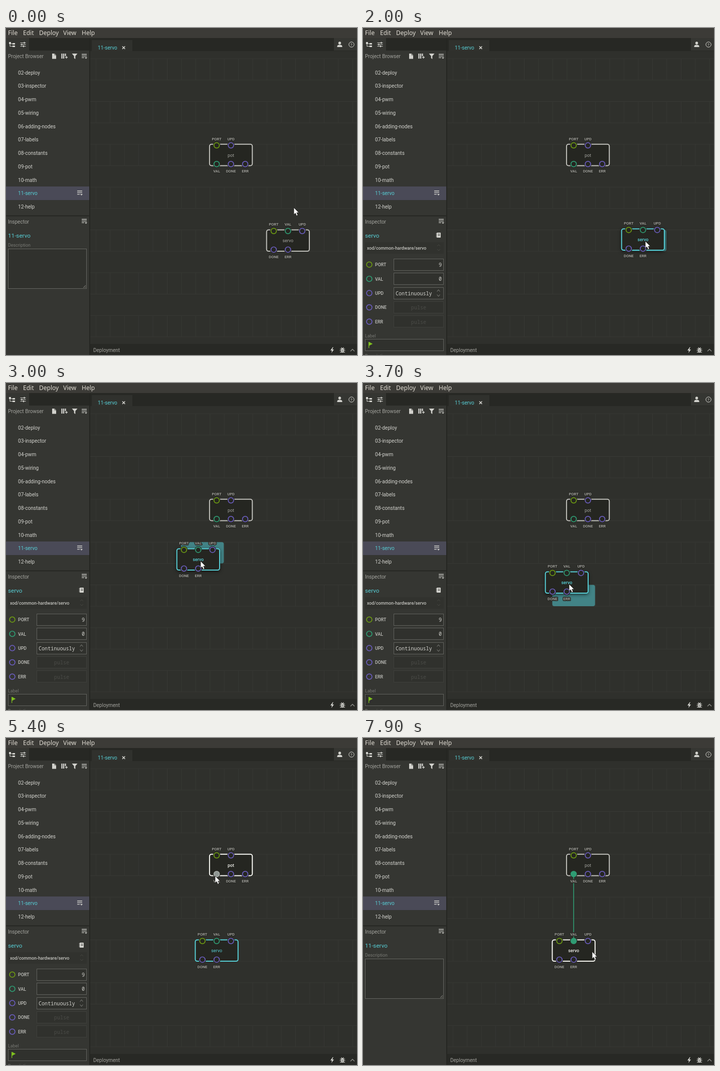
An HTML page that plays this animation: 700 px wide and 652 px high, repeating every 8000 ms.

```html
<!DOCTYPE html>
<html lang="en">
<head>
<meta charset="utf-8">
<title>Node patching</title>
<style>
  html, body { margin: 0; width: 100%; height: 100%; overflow: hidden; background: #2f302c; }
  svg { display: block; width: 100vw; height: 100vh; }
  text { font-family: Roboto, sans-serif; white-space: pre; }
  .menu { font-family: "Noto Sans", sans-serif; }
  .mono { font-family: "Noto Sans Mono", monospace; }
  .pin { font-weight: 500; paint-order: stroke; stroke: #2c2d29; stroke-width: 3.5px; stroke-linejoin: round; }
  .medium { font-weight: 500; }
  .lifted { filter: drop-shadow(0 2px 3px rgba(0, 0, 0, .6)); }
</style>
</head>
<body>
<svg id="stage" viewBox="0 0 700 652" preserveAspectRatio="none">
  <g id="chrome"></g>
  <g id="inspector"></g>
  <g id="patch"></g>
  <path id="cursor" d="M0 0V14L3.2 11.2 5.4 16.4 8 15.2 5.8 10.2H10Z" fill="#fff" stroke="#1b1b19" stroke-width=".8"/>
</svg>
<script>
const LOOP = 8000, STEP = 100;
const COL = 28.44, ROW = 85.33, NODE_W = 85.3, NODE_H = 42.6;
const slotX = c => 178.4 + COL * c;
const slotY = r => 61.2 + ROW * r;
const GREEN = '#6d9b12', TEAL = '#2f9c73', PURPLE = '#6a5dbd', CYAN = '#57ced5';
const LIGHT = '#d2d2cd', DIM = '#a3a39e';

// Cursor keys: time, x, y
const PATH = [
  [600, 574, 358], [800, 574, 395], [1000, 612, 432], [1200, 688, 452], [1300, 684, 459],
  [1500, 641, 458], [1700, 641, 458], [1900, 567, 427], [2000, 563, 425], [2200, 518, 394],
  [2400, 447, 360], [2600, 412, 351], [2700, 399, 351], [2800, 388, 355], [3200, 388, 355],
  [3500, 397, 375], [3700, 411, 401], [3900, 419, 418], [4100, 421.5, 423], [4200, 421.5, 423],
  [4300, 423, 424], [4500, 423, 424], [4700, 430, 412], [5000, 434, 340], [5200, 424, 294],
  [5400, 417, 275], [5900, 417, 275], [6000, 430, 236], [6200, 440, 300], [6500, 394, 385],
  [6700, 416, 406], [6800, 417, 408], [6900, 417, 408], [7200, 470, 430], [7400, 505, 440],
  [7500, 504, 440], [7800, 465, 427], [7900, 457, 426]
];
const GRAB = { x: 47.3, y: 24.5 };

const $ = id => document.getElementById(id);
const text = (x, mid, str, size, fill, extra = '') =>
  `<text x="${x}" y="${mid + size * .355}" font-size="${size}" fill="${fill}" ${extra}>${str}</text>`;
const rect = (x, y, w, h, fill, extra = '') =>
  `<rect x="${x}" y="${y}" width="${w}" height="${h}" fill="${fill}" ${extra}/>`;
const circle = (x, y, r, fill, extra = '') =>
  `<circle cx="${x}" cy="${y}" r="${r}" fill="${fill}" ${extra}/>`;
const line = (d, color, width = 1.4) =>
  `<path d="${d}" fill="none" stroke="${color}" stroke-width="${width}"/>`;
const shape = (d, fill = LIGHT) => `<path d="${d}" fill="${fill}"/>`;
const ring = (x, y, color, fill = 'none') => circle(x, y, 5.4, fill, `stroke="${color}" stroke-width="1.7"`);
const frame = (x, y, w, h, color) => rect(x + .5, y + .5, w, h, '#30312d', `stroke="${color}"`);
const listIcon = (x, y) =>
  line(`M${x - 5} ${y - 4}h10M${x - 5} ${y - .7}h10M${x - 5} ${y + 2.6}h5`, LIGHT, 1.3) +
  shape(`M${x + 1} ${y + 2}h5l-2.5 3z`);

function drawChrome() {
  let s = rect(0, 0, 700, 652, '#2f302c');

  let grid = '';
  for (let r = 0; r < 7; r++) {
    const y = slotY(r);
    grid += `M168 ${y}H700M168 ${y + NODE_H}H700`;
    for (let c = 0; c < 19; c++) grid += `M${slotX(c) + .9} ${y}v${NODE_H}`;
  }
  s += line(grid, '#383935', 1);

  s += rect(0, 0, 700, 20, '#3c3b37');
  [['File', 4], ['Edit', 34], ['Deploy', 66], ['View', 114], ['Help', 151]]
    .forEach(([label, x]) => s += text(x, 10, label, 12, '#dfdbd2', 'class="menu"'));

  s += rect(168, 20, 532, 26, '#272824') + rect(171, 24, 81, 22, '#30312d') + rect(654, 20, 46, 25, '#353632');
  s += text(183, 39, '11-servo', 10.15, CYAN) + line('M232 36.5l5.4 5.4m0-5.4l-5.4 5.4', LIGHT, 1.5);
  s += circle(665.5, 30, 2.7, LIGHT) + shape('M660.5 38v-1.5q0-3 5-3t5 3V38z');
  s += circle(689, 33, 5.2, 'none', `stroke="${LIGHT}"`) + text(689, 33, '?', 8, LIGHT, 'text-anchor="middle"');

  s += rect(0, 20, 166, 632, '#353632') + rect(46, 20, 120, 25, '#272824') + rect(166, 20, 2, 632, '#252622');
  s += rect(6, 28, 4, 4, LIGHT) + rect(13, 30, 5, 3, LIGHT) + rect(13, 35, 5, 3, LIGHT) + line('M8 31v5.5h5M8 31.5h5', LIGHT, 1.1);
  s += line('M28.500 29.500h11M28.500 33h11M28.500 36.500h11', LIGHT, 1.2) +
    line('M36.500 27.800v3.400M31.500 31.300v3.400M35 34.800v3.400', LIGHT, 1.8);

  s += text(4, 56.5, 'Project Browser', 10.05, DIM);
  s += shape('M92 51h5l3 3v7.500h-8z') + line('M97 51v3h3', '#353632', .8);
  s += line('M111.500 51v10M115 51v10M118.500 51v5', LIGHT, 2.3) + line('M118 58.500h5M120.500 56v5', LIGHT, 1.3);
  s += shape('M131.500 51h11l-4.200 5v6l-2.600-2v-4z') + listIcon(156, 56.5);

  s += rect(0, 316, 166, 27, '#4a4a57');
  ['02-deploy', '03-inspector', '04-pwm', '05-wiring', '06-adding-nodes', '07-labels',
    '08-constants', '09-pot', '10-math', '11-servo', '12-help'].forEach((name, i) => {
    s += text(24, 89 + i * 26.75, name, 10.1, i === 9 ? CYAN : LIGHT);
  });
  s += listIcon(147, 329);

  s += rect(0, 373.5, 166, 2, '#262723') + text(4, 386, 'Inspector', 10.05, DIM) + listIcon(156, 385.5);

  s += rect(168, 630, 532, 22, '#282925') + text(174, 642.5, 'Deployment', 10, DIM);
  s += shape('M651.500 636.500l-4.500 6.500h3l-1 5 5-7h-3.200l2-4.500z');
  s += `<ellipse cx="671" cy="643" rx="3" ry="4.300" fill="${LIGHT}"/>` +
    line('M666 640l10 0M665.500 643h11M666 646.500h10M668.500 637l2 2M673.500 637l-2 2', LIGHT, 1.1) +
    line('M669.500 642h3M669.500 644.500h3', '#282925', .8);
  s += line('M687 644.500l4-4 4 4', '#8d8d88', 1.4);
  $('chrome').innerHTML = s;
}

function patchInspector() {
  return text(4, 413.5, '11-servo', 11.7, CYAN) + text(4, 433, 'Description', 8.9, '#777873') +
    frame(4, 440, 156, 79, '#666762') + line('M154 518l5-5M157 518l2-2', '#9a9a95', .9);
}

function nodeInspector() {
  let s = text(4, 413.5, 'servo', 11.7, CYAN);
  s += rect(147, 408, 8, 10, LIGHT, 'rx="1"') + line('M149.500 411h4M149.500 413.500h4', '#353632', 1) +
    line('M145.500 410h3M145.500 413h3M145.500 416h3', LIGHT, 1);
  s += rect(4, 427, 157, 23, '#31322e') + text(8, 438.5, 'xod/common-hardware/servo', 8.9, '#c3c3be', 'class="medium"');
  s += line('M148 435l3-3 3 3M148 441l3 3 3-3', '#454641', 1);
  [['PORT', GREEN, '9'], ['VAL', TEAL, '0'], ['UPD', PURPLE, 'Continuously'],
    ['DONE', PURPLE, 'pulse'], ['ERR', PURPLE, 'pulse']].forEach(([name, color, value], i) => {
    const y = 471.7 + i * 28.44, top = Math.round(y - 12), off = i > 2;
    s += ring(12.5, y, color) + text(24, y + .3, name, 8.8, '#c3c3be', 'class="medium"');
    s += frame(61, top, 99, 23, off ? '#3e3f3b' : '#62635e');
    const [x, anchor] = i < 2 ? [157, 'end'] : off ? [111, 'middle'] : [65, 'start'];
    s += text(x, y + .5, value, 10.1, off ? '#4b4c48' : LIGHT, `class="mono" text-anchor="${anchor}"`);
  });
  s += line('M147.500 525.500l3-3.500 3 3.500M147.500 531.500l3 3.500 3-3.500', '#777873', 1.1);
  s += text(4, 613.5, 'Label', 8.8, '#777873') + frame(4, 620, 156, 23, '#62635e');
  s += shape('M11 626h1.300l7 3.800-7 3.700v4.500H11z', '#7fbf1f') + text(4, 654, 'Description', 8.9, '#777873');
  return s;
}

const pinAt = (node, top, i) => ({ x: node.x + COL * (i + .5), y: node.y + (top ? 2.2 : 39.4) });
const eachPin = (node, draw) => {
  node.inputs.forEach((p, i) => draw(p, pinAt(node, true, i), true));
  node.outputs.forEach((p, i) => draw(p, pinAt(node, false, i), false));
};

function nodeBody(node) {
  const border = node.selected ? CYAN : node.hover ? '#f6f6f1' : '#bfbfba';
  const color = node.selected ? CYAN : node.hover ? '#eeeee9' : DIM;
  let s = rect(node.x, node.y, NODE_W, NODE_H, '#252621',
    `rx="4" stroke="${border}" stroke-width="2" ${node.lifted ? 'class="lifted"' : ''}`);
  eachPin(node, (p, at) => s += circle(at.x, at.y, 7.4, '#272823'));
  return s + text(node.x + NODE_W / 2, node.y + 21.5, node.name, 8.9, color,
    `text-anchor="middle" ${node.hover ? 'font-weight="500"' : ''}`);
}

function nodePins(node, linked, cursor, canHover) {
  let s = '';
  eachPin(node, ([name, color], at, top) => {
    s += text(at.x, at.y + (top ? -13.2 : 14.2), name, 7.6, '#aaaaa5', 'class="pin" text-anchor="middle"');
  });
  eachPin(node, ([name, color], at) => {
    const near = canHover && Math.hypot(cursor.x - at.x, cursor.y - at.y) < 6;
    const fill = linked && name === 'VAL' ? color : near ? '#8f9793' : '#252621';
    s += ring(at.x, at.y, near ? '#a5aaa6' : color, fill);
  });
  return s;
}

function cursorAt(t) {
  const next = PATH.findIndex(k => k[0] > t);
  const [t1, x1, y1] = PATH[next < 0 ? PATH.length - 1 : next];
  if (next <= 0) return { x: x1, y: y1 };
  const [t0, x0, y0] = PATH[next - 1];
  const k = (t - t0) / (t1 - t0);
  return { x: x0 + (x1 - x0) * k, y: y0 + (y1 - y0) * k };
}

const inside = (p, n) => p.x > n.x - 3 && p.x < n.x + NODE_W + 3 && p.y > n.y - 3 && p.y < n.y + NODE_H + 3;

function render(t) {
  const cursor = cursorAt(t);
  const selected = t >= 1900 && t < 7000;
  const dragging = t >= 1900 && t < 4400;
  const linking = t >= 5900 && t < 7000;
  const linked = t >= 7000;

  const pot = {
    name: 'pot', x: slotX(8), y: slotY(2),
    inputs: [['PORT', GREEN], ['UPD', PURPLE]],
    outputs: [['VAL', TEAL], ['DONE', PURPLE], ['ERR', PURPLE]]
  };
  const servo = {
    name: 'servo', x: slotX(t < 1900 ? 12 : 7), y: slotY(4), selected, lifted: dragging,
    inputs: [['PORT', GREEN], ['VAL', TEAL], ['UPD', PURPLE]],
    outputs: [['DONE', PURPLE], ['ERR', PURPLE]]
  };
  let s = '';
  if (dragging) {
    servo.x = cursor.x - GRAB.x;
    servo.y = cursor.y - GRAB.y;
    const gx = slotX(Math.round((servo.x - slotX(0)) / COL));
    const gy = slotY(Math.round((servo.y - slotY(0)) / ROW));
    s += rect(gx, gy, NODE_W, NODE_H, '#428386', 'rx="4"');
  }
  pot.hover = linking || (!dragging && inside(cursor, pot));
  servo.hover = dragging || inside(cursor, servo);

  const from = pinAt(pot, false, 0), to = pinAt(servo, true, 1);
  s += nodeBody(pot) + nodeBody(servo);
  if (linked) s += line(`M${from.x} ${from.y}L${to.x} ${to.y}`, TEAL, 1.6);
  const canHover = !dragging && !linking && !linked;
  if (linking) s += circle(from.x, from.y, 12, '#3c8488') + circle(to.x, to.y, 12, '#8c8c87');
  s += nodePins(pot, linked, cursor, canHover) + nodePins(servo, linked, cursor, canHover);
  if (linking) s += line(`M${from.x} ${from.y}L${cursor.x} ${cursor.y}`, TEAL, 1.6);

  $('patch').innerHTML = s;
  $('inspector').innerHTML = selected ? nodeInspector() : patchInspector();
  $('cursor').setAttribute('transform', `translate(${cursor.x} ${cursor.y})`);
}

drawChrome();
let shown = -1;
function tick(now) {
  const t = Math.floor((now % LOOP) / STEP) * STEP;
  if (t !== shown) render(shown = t);
  requestAnimationFrame(tick);
}
tick(performance.now());
</script>
</body>
</html>
```
